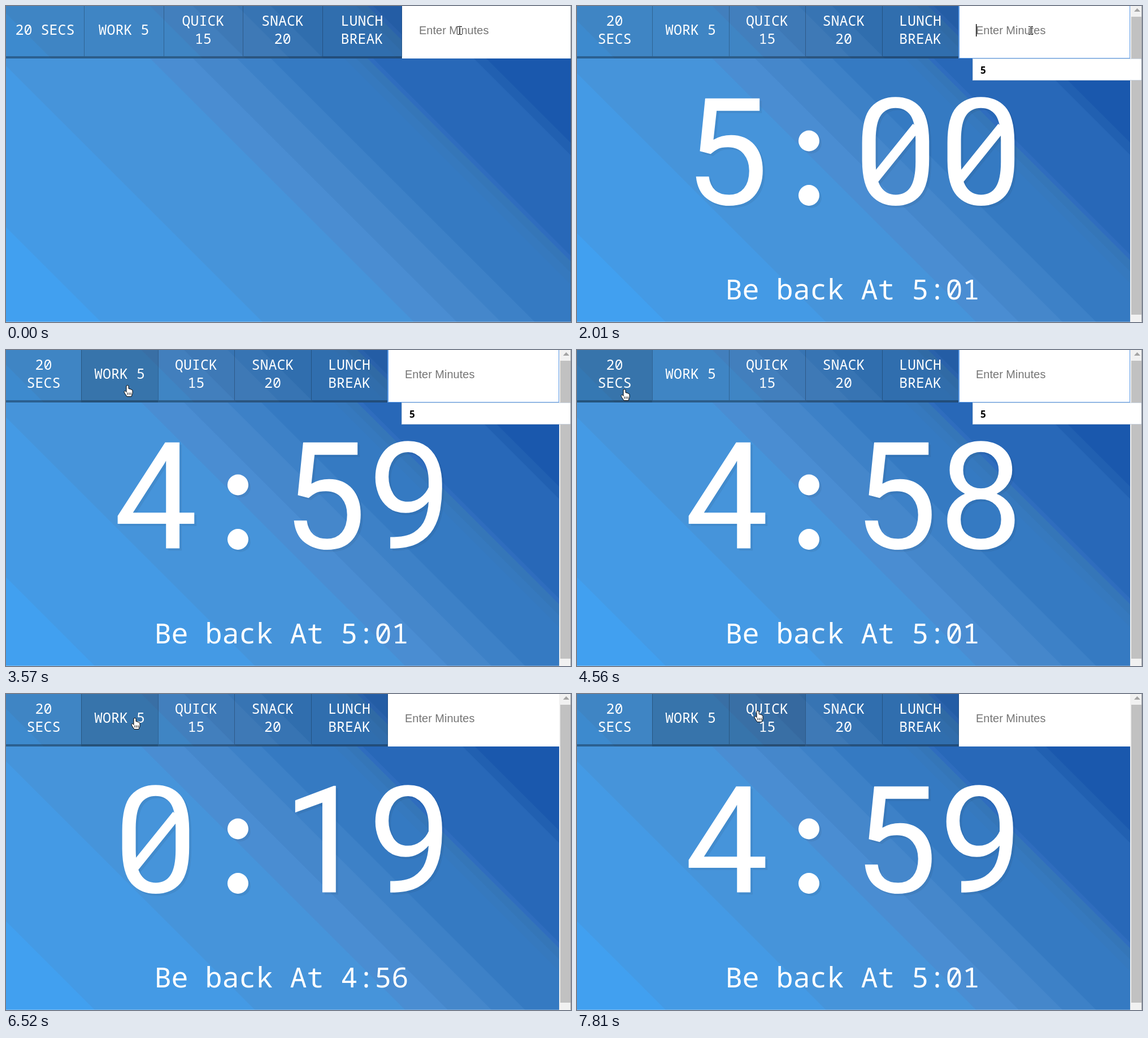
An HTML page with a canvas for the animation above (8 s loop, 1000x560 px).

```html
<!DOCTYPE html>
<html lang="en">
<head>
<meta charset="utf-8">
<title>Break timer</title>
<style>
  html, body { margin: 0; width: 100%; height: 100%; overflow: hidden; }
  canvas { display: block; }
</style>
</head>
<body>
<canvas id="stage" width="1000" height="560"></canvas>
<script>
const ctx = document.getElementById('stage').getContext('2d');
const LOOP = 8000;
const MONO = '"Noto Sans Mono", monospace';
const ARIAL = '"Liberation Sans", Arial, sans-serif';

// Diagonal background bands: [x - y of the left edge, colour]
const BANDS = [
  [-700, '#41a0f0'], [-392, '#449ae5'], [-106, '#4694da'], [162, '#4a8dd2'],
  [238, '#4587cb'], [316, '#3d81c7'], [376, '#357ac2'], [506, '#3679be'],
  [527, '#3576b8'], [547, '#2f6dbe'], [557, '#2868b8'], [735, '#2160b1'], [757, '#1a58ad']
];
const BUTTONS = ['20 SECS', 'WORK 5', 'QUICK 15', 'SNACK 20', 'LUNCH BREAK'];
const WIDE_EDGES = [0, 138, 279, 419, 560, 700];
const SLIM_EDGES = [0, 133, 269, 404, 540, 675];

// Keyed states: [start time, value]
const TIMER = [[0, ''], [2010, '5:00'], [3010, '4:59'], [4010, '4:58'], [4980, '0:20'],
  [6020, '0:19'], [6800, '5:00'], [7810, '4:59']];
const BACK_AT = [[0, ''], [2010, '5:01'], [4980, '4:56'], [6800, '5:01']];
const CARET = [[0, 0], [930, 1], [1340, 0], [1610, 1], [2510, 0], [3010, 1], [3510, 0],
  [4010, 1], [4560, 0]];
const FOCUSED = [[0, -1], [4840, 0], [6520, 1]];
const POINTER = [[0, null], [3280, [540, 60]], [3420, [360, 60]], [3570, [215, 62]],
  [3690, [125, 66]], [3820, [95, 68]], [4190, [84, 69]], [5390, [150, 80]],
  [5520, [209, 81]], [5640, [218, 72]], [5760, [226, 55]], [5880, [228, 42]],
  [6920, [258, 36]], [7040, [300, 31]], [7160, [320, 29]]];

const at = (keys, t) => keys.filter(k => k[0] <= t).pop()[1];

function rect(x, y, w, h, color) {
  ctx.fillStyle = color;
  ctx.fillRect(x, y, w, h);
}

function text(str, x, y, font, color = '#fff', align = 'center') {
  ctx.font = font;
  ctx.textAlign = align;
  ctx.fillStyle = color;
  ctx.fillText(str, x, y);
}

function background(slim, top, height, shift) {
  ctx.save();
  ctx.beginPath();
  ctx.rect(0, top, 1000, height);
  ctx.clip();
  for (const [edge, color] of BANDS) {
    const x = (slim ? edge * 0.992 - 14 : edge) + shift;
    ctx.fillStyle = color;
    ctx.beginPath();
    ctx.moveTo(x, 0);
    ctx.lineTo(x + 560, 560);
    ctx.lineTo(1700, 560);
    ctx.lineTo(1700, 0);
    ctx.fill();
  }
  ctx.restore();
}

function header(edges, active) {
  const width = edges[5];
  rect(0, 0, width, 93, 'rgba(0,0,0,.1)');
  BUTTONS.forEach((label, i) => {
    const left = edges[i], right = edges[i + 1];
    if (active.includes(i)) rect(left, 0, right - left, 93, 'rgba(0,0,0,.13)');
    rect(right, 0, 1, 89, 'rgba(0,0,0,.25)');
    ctx.font = '25px ' + MONO;
    const fits = ctx.measureText(label).width < right - left - 30;
    const lines = fits ? [label] : label.split(' ');
    lines.forEach((line, row) => text(line, (left + right) / 2,
      fits ? 51 : 35 + row * 32, ctx.font));
  });
  rect(0, 89, width + 1, 4, 'rgba(0,0,0,.3)');
}

function input(left, right, t) {
  const typed = t >= 1610 && t < 2010;
  rect(left, 0, right - left, 93, '#fff');
  text(typed ? '5' : 'Enter Minutes', left + 30, 50, '20px ' + ARIAL,
    typed ? '#000' : '#757575', 'left');
  if (t >= 930 && t < 4840) {
    const blue = '#5d9ce8';
    rect(left - 1, 0, 2, 93, blue);
    rect(right - 1, 0, 1, 93, blue);
    rect(left - 1, 92, right - left + 1, 1, blue);
  }
  if (at(CARET, t)) rect(left + (typed ? 40 : 30), 32, 1.4, 22, '#000');
}

function scrollbar() {
  rect(979, 0, 21, 560, '#f1f1f1');
  rect(981, 19, 18, 528, '#c1c1c1');
  ctx.fillStyle = '#a3a3a3';
  ctx.beginPath();
  ctx.moveTo(986, 10);
  ctx.lineTo(991.5, 4);
  ctx.lineTo(997, 10);
  ctx.fill();
}

function suggestion() {
  rect(700, 93, 300, 39, '#c8d2de');
  rect(701, 94, 298, 37, '#fff');
  text('5', 714, 120, 'bold 17px "Open Sans", "Noto Sans", sans-serif', '#000', 'left');
}

function digits(value, color) {
  [[0, 265], [2, 564], [3, 715]].forEach(([i, x]) => {
    text(value[i], x, 351.5, '264px Roboto, sans-serif', color);
    if (value[i] === '0') {
      ctx.strokeStyle = color;
      ctx.lineWidth = 16.5;
      ctx.beginPath();
      ctx.moveTo(x - 37, 306);
      ctx.lineTo(x + 37, 214);
      ctx.stroke();
    }
  });
  ctx.beginPath();
  ctx.arc(410.5, 239, 18.5, 0, 7);
  ctx.arc(410.5, 335.5, 18.5, 0, 7);
  ctx.fill();
}

function countdown(value, back) {
  ctx.save();
  ctx.translate(4, 4);
  digits(value, 'rgba(0,0,0,.06)');
  ctx.restore();
  digits(value, '#fff');
  text('Be back At ' + back, 487.5, 520, '50px ' + MONO);
}

const HAND = new Path2D('M-2 12V1Q0 -1 2 1V6L6 7L9 9V14L7 20H-1L-5 14Q-7 10 -4 10Z');

function pointer(pos) {
  if (!pos) {
    for (const y of [36, 50]) {
      rect(799, y, 3.5, 1, '#000');
      rect(803.5, y, 3.5, 1, '#000');
    }
    rect(802.5, 37, 1, 13, '#000');
    return;
  }
  ctx.save();
  ctx.translate(pos[0], pos[1] + 0.5);
  ctx.lineWidth = 1;
  ctx.fillStyle = '#fff';
  ctx.strokeStyle = '#000';
  ctx.fill(HAND);
  ctx.stroke(HAND);
  ctx.beginPath();
  for (const x of [0, 3, 6]) {
    ctx.moveTo(x, 13);
    ctx.lineTo(x, 17);
  }
  ctx.stroke();
  ctx.restore();
}

function draw(t) {
  const slim = t >= 2010;
  const edges = slim ? SLIM_EDGES : WIDE_EDGES;
  const pos = at(POINTER, t);
  const hovered = pos ? edges.findLastIndex(x => x <= pos[0]) : -1;

  background(slim, 93, 467, 0);
  background(slim, 0, 93, 93);
  header(edges, [hovered, at(FOCUSED, t)]);
  input(edges[5] + 1, slim ? 979 : 1000, t);
  if (slim) {
    scrollbar();
    countdown(at(TIMER, t), at(BACK_AT, t));
  }
  if (t >= 1610 && t < 4840) suggestion();
  rect(999, 0, 1, 560, 'rgba(70,80,95,.5)');
  rect(0, 559, 1000, 1, 'rgba(255,255,255,.3)');
  pointer(pos);
}

const start = performance.now();
function tick() {
  draw((performance.now() - start) % LOOP);
  requestAnimationFrame(tick);
}
tick();
</script>
</body>
</html>
```
